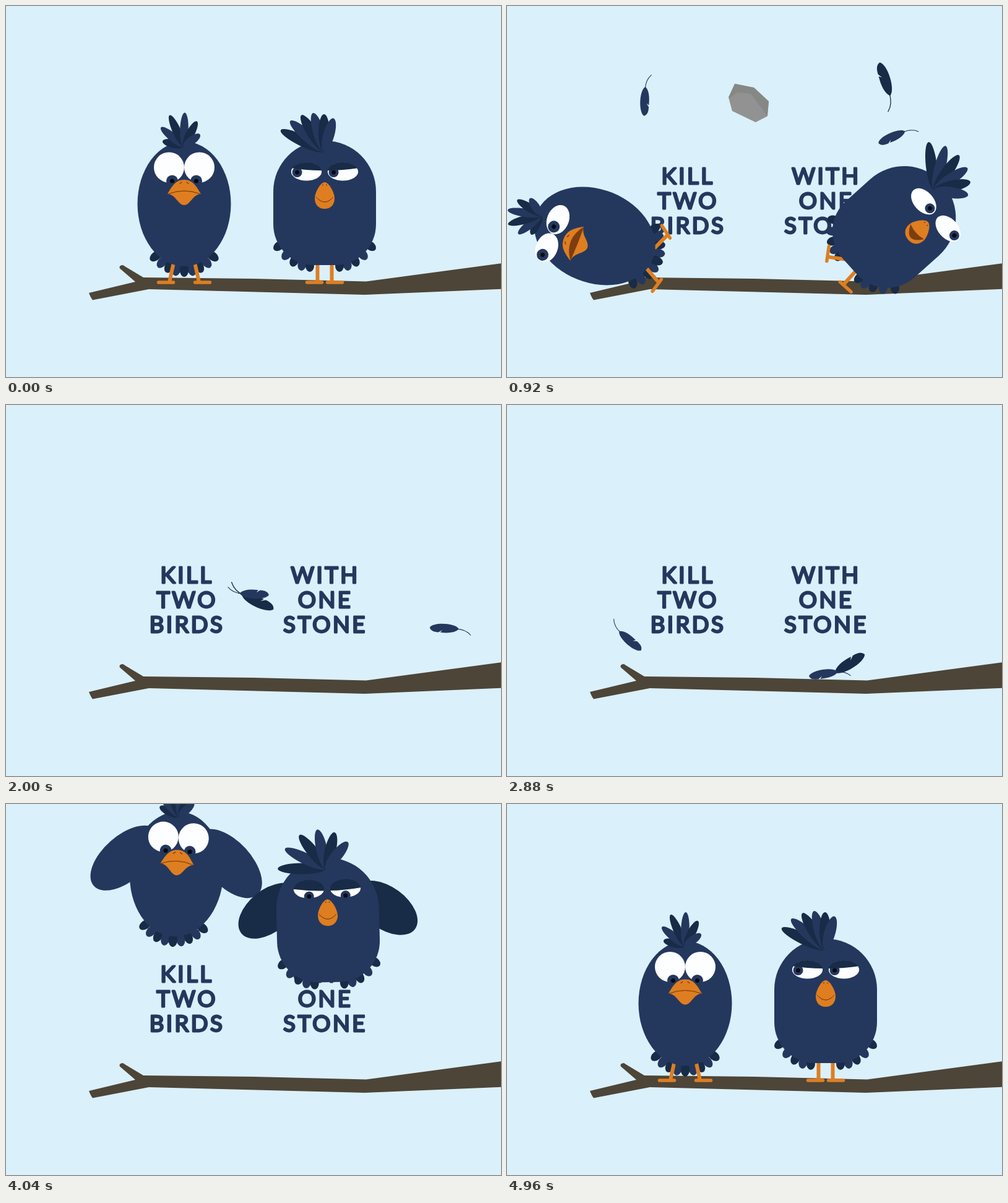
Recreate the animation shown at these times as an HTML page with a canvas. Size 800 by 600 pixels, loop 5 s.

```html
<!DOCTYPE html>
<html lang="en">
<head>
<meta charset="utf-8">
<title>Two birds</title>
<style>
  html, body { margin: 0; width: 100%; height: 100%; overflow: hidden; background: #daf0fb; }
  canvas { display: block; width: 100vw; height: 100vh; }
</style>
</head>
<body>
<canvas id="stage" width="800" height="600"></canvas>
<script>
const ctx = document.getElementById('stage').getContext('2d');
const LOOP = 5000, RETURN = 3380;
const SKY = '#daf0fb', NAVY = '#24385e', DARK = '#182b47', ORANGE = '#de7e21',
      BROWN = '#7d3d10', BARK = '#4d4538', WHITE = '#fdfeff';
const rad = deg => deg * Math.PI / 180;
const lerp = (a, b, k) => a + (b - a) * k;
const part = (t, a, b) => Math.min(1, Math.max(0, (t - a) / (b - a)));
const ramp = (t, a, b) => { const k = part(t, a, b); return k * k * (3 - 2 * k); };
const bump = (t, a, b) => Math.sin(Math.PI * part(t, a, b));

function at(x, y, deg, draw) {
  ctx.save();
  ctx.translate(x, y);
  ctx.rotate(rad(deg));
  draw();
  ctx.restore();
}
function oval(x, y, rx, ry, color, deg = 0) {
  ctx.fillStyle = color;
  ctx.beginPath();
  ctx.ellipse(x, y, rx, ry, rad(deg), 0, 7);
  ctx.fill();
}
function shape(path, color) {
  ctx.fillStyle = color;
  ctx.fill(new Path2D(path));
}
function line(path, color, width, cap = 'round') {
  ctx.strokeStyle = color;
  ctx.lineWidth = width;
  ctx.lineCap = cap;
  ctx.stroke(new Path2D(path));
}

const skinny = {
  x: 288, y: 320, hit: 560, land: 740,
  fling: { x: -405, y: -939, spin: -189 },
  flight: { top: -485, mid: -207, low: -97, drift: .06, tilt: -.015 },
  body: () => oval(0, 0, 75.5, 101, NAVY),
  tail() {
    for (let k = 4; k >= 0; k--)
      for (const side of [-1, 1])
        oval(side * 75 * Math.sin(k * .165), 107 * Math.cos(k * .165), 7, 11, k % 2 ? NAVY : DARK, -side * k * 13);
  },
  crest: { y: -93, lean: -11, spread: 65, windy: -10, jolt: -14,
           size: i => 35 + 21 * Math.sin(i * .65), width: 13.5 },
  leg: { hip: 17.5, lean: 6.5, heel: 0, toe: 24, length: 30, splay: [15, -55] },
  eye: { x: 24.5, y: -59, rx: 24.5, ry: 24.5, iris: 9.5, squint: 5, jolt: -.28 },
  look: { calm: [0, 22], down: [0, 22], dazed: [-13, -2] },
  wing: { x: 40, y: -65, reach: 62, rx: 68, ry: 36, color: NAVY, high: 45, low: 42 },
  beak: 'M-27-16C-20-28-14-39 0-39S20-28 27-16C13-15 10 2 0 2S-13-15-27-16Z',
  nostrils: 'M-7-33l3-2M7-33l-3-2',
  mouth: { half: 26, y: -16, bend: -10 },
  face: { x: -22, y: -6 }
};
const stout = {
  x: 515, y: 318, hit: 660, land: 640,
  fling: { x: 438, y: -646, spin: 184 },
  flight: { top: -465, mid: -131, low: -39, drift: -.04, tilt: .011 },
  body() {
    ctx.fillStyle = NAVY;
    ctx.beginPath();
    ctx.roundRect(-83, -100, 166, 201, [82, 82, 66, 66]);
    ctx.fill();
  },
  tail() {
    for (let k = 4; k >= 0; k--)
      for (const side of [-1, 1])
        oval(side * (24 + 12.5 * k), 102 - 2 * k * k, 7, 10, k % 2 ? NAVY : DARK, -side * k * 13);
  },
  crest: { y: -83, lean: -24, spread: 40, windy: 25, jolt: 22, size: i => 78 - 4.5 * i, width: 18 },
  leg: { hip: 11.5, lean: 0, heel: -7, toe: 17, length: 32, splay: [50, -6] },
  eye: { x: 29.5, y: -50, rx: 24.7, ry: 14.5, iris: 8, squint: 0, jolt: .1 },
  look: { calm: [-15, 1], down: [0, 11.5], dazed: [15, 0] },
  lids: true,
  wing: { x: 54, y: -48, reach: 51, rx: 58, ry: 34, color: DARK, high: 38, low: 63 },
  beak: 'M0-33C7-33 16-16 16-7 16 4 9 10 0 10S-16 4-16-7C-16-16-7-33 0-33Z',
  nostrils: 'M-3-29v1M3-29v1',
  mouth: { half: 14, y: -9, bend: 16 },
  face: { x: 31, y: -8 }
};

function struckPose({ hit, fling, look }, t) {
  const s = Math.max(0, t - hit) / 1000, shock = ramp(t, hit, hit + 120);
  return { x: fling.x * s, y: fling.y * s + 3000 * s * s, turn: fling.spin * s, shock,
    dip: 0, lift: 0, wind: shock * .5, wingAngle: null, lid: lerp(-4, -20, shock),
    look: look.calm.map((v, n) => lerp(v, look.dazed[n], shock)) };
}

function returnPose({ land, flight, look, wing }, t, sag) {
  const touch = 4000 + land;
  const y = t < 4040 ? lerp(flight.top, flight.mid, 1 - (1 - part(t, 3400, 4040)) ** 1.4)
    : t < 4520 ? lerp(flight.mid, flight.low, part(t, 4040, 4520))
    : lerp(flight.low, 0, part(t, 4520, touch));
  const flap = lerp(wing.high, wing.low, ramp(t, 4040, 4520)) - 16 * Math.sin((t - 4040) / 240 * 2 * Math.PI);
  const fold = ramp(t, touch - 120, touch + 20), glance = ramp(t, 4660, 4840);
  return { x: flight.drift * y, y, turn: flight.tilt * y, shock: 0,
    dip: 6 * bump(t, touch - 30, touch + 260),
    lift: 100 * (1 - ramp(t, touch - 280, touch - 70)),
    wind: Math.min(1, .45 - y / 240) * (1 - ramp(t, touch - 40, touch + 220)),
    wingAngle: fold < 1 ? lerp(flap, 100, fold) : null,
    lid: Math.max(lerp(1, -20, ramp(t, 4200, 4440)), lerp(-20, -4, glance)),
    look: look.down.map((v, n) => lerp(v, look.calm[n], glance)) };
}

function drawWings({ wing }, angle) {
  for (const side of [-1, 1])
    oval(side * (wing.x + wing.reach * Math.cos(rad(angle))), wing.y + wing.reach * Math.sin(rad(angle)),
      wing.rx, wing.ry, wing.color, side * angle);
}

function drawLegs({ leg }, pose) {
  [-1, 1].forEach((side, n) => {
    const lift = Math.min(50, pose.lift * (n ? .55 : 1));
    at(side * leg.hip, 97 - lift - pose.dip, leg.splay[n] * pose.shock, () => {
      line(`M0 0L${side * leg.lean} ${leg.length}`, ORANGE, 6, 'butt');
      line(`M${side * leg.heel} ${leg.length}H${side * leg.toe}`, ORANGE, 5.4);
    });
  });
}

function drawCrest({ crest }, { wind, shock }) {
  const spread = crest.spread + crest.windy * wind;
  for (let i = 0; i < 6; i++) {
    const length = crest.size(i);
    at(-1, crest.y, crest.lean + crest.jolt * shock + spread * (i / 2.5 - 1), () =>
      oval(0, -length / 2, crest.width / 2, length / 2, i % 2 ? NAVY : DARK));
  }
}

function drawEye({ eye, lids }, side, { shock, look, lid }) {
  at(side * eye.x, eye.y, 0, () => {
    const height = eye.ry * (1 + eye.jolt * shock), px = look[0] - side * eye.squint * (1 - shock);
    oval(0, 0, eye.rx, height, WHITE);
    oval(px, look[1], eye.iris, eye.iris, NAVY);
    oval(px, look[1], 3.5, 3.5, '#050a14');
    if (!lids) return;
    ctx.beginPath();
    ctx.ellipse(0, 0, eye.rx + .4, height + .6, 0, 0, 7);
    ctx.clip();
    shape(`M-26-20H26V${lid - 2 * side}Q0 ${lid + 2}-26 ${lid + 2 * side}Z`, DARK);
  });
}

function drawBeak({ beak, mouth, nostrils }, shock) {
  ctx.scale(1 + .1 * shock, 1);
  shape(beak, ORANGE);
  const { half, y, bend } = mouth, gape = 11 * shock;
  const lips = `M${-half} ${y}Q0 ${y + bend - gape} ${half} ${y}Q0 ${y + bend + gape} ${-half} ${y}Z`;
  shape(lips, BROWN);
  line(lips, BROWN, .8);
  line(nostrils, BROWN, 1.4);
}

function drawBird(bird, t, sag) {
  const pose = t < RETURN ? struckPose(bird, t) : returnPose(bird, t);
  const ride = (800 - bird.x) * sag;
  at(bird.x + pose.x, bird.y + pose.y + ride, pose.turn, () => {
    if (pose.wingAngle !== null) drawWings(bird, pose.wingAngle);
    ctx.translate(0, pose.dip);
    bird.tail();
    drawLegs(bird, pose);
    bird.body();
    drawCrest(bird, pose);
    ctx.translate(bird.face.x * pose.shock, bird.face.y * pose.shock);
    drawEye(bird, -1, pose);
    drawEye(bird, 1, pose);
    drawBeak(bird, pose.shock);
  });
}

// Each feather swings like a pendulum while its fall slows down.
const feathers = [
  { size: 1.2, color: DARK, mid: 499, sway: 124, lag: .45, top: 118, depth: 480, tilt: 161, turn: -89 },
  { size: 1, color: NAVY, mid: 291, sway: -114, lag: .93, top: 154, depth: 364, tilt: -147, turn: 60 },
  { size: 1, color: NAVY, mid: 615, sway: -104, lag: 1.64, top: 212, depth: 357, tilt: -6, turn: -18 }
];

function drawFeather(t, f) {
  if (t < 620 || t > 3290) return;
  const s = (t - 920) / 1000, rise = Math.min(0, s), drop = Math.max(0, s - 1.96);
  const x = f.mid + f.sway * Math.cos(4 * s - f.lag);
  const y = f.top + f.depth * (1 - Math.exp(-s / 2)) + 2000 * rise * rise + 1900 * drop * drop;
  at(x, y, f.tilt + f.turn * Math.cos(4 * s - .13), () => {
    ctx.scale(f.size, f.size);
    shape('M23.5 0C18-9.5-18-9.5-23.5 0-22 5-17 7-9 7L-3 3-6 7C7 8 19 6 23.5 0Z', f.color);
    line('M20 0Q35 0 43 9', f.color, 1.1);
  });
}

function drawStone(t) {
  if (t < 300 || t > 1700) return;
  const k = part(t, 300, stout.hit), s = Math.max(0, t - stout.hit) / 1000;
  at(lerp(-45, 427, k) - 138 * s, lerp(535, 290, k) - 836 * s + 1250 * s * s, (t - 920) * .36, () => {
    shape('M-23-31L8-25 32-3 30 21 11 31-27 13-33-9Z', '#929292');
    shape('M-23-31L8-25 32-3 30 21 3-15-19-17-31-8-33-9Z', '#868885');
  });
}

function drawBranch(sag) {
  at(800, 437, -sag * 180 / Math.PI, () => {
    ctx.translate(-800, -437);
    shape(`M134 464L209 446 184 424.5Q182 420 188 419 190 419 192 421L222 439
      400 441 582 445.5 820 413.5V457L580 467 231 458 140 475.5Q137 472 134 464Z`, BARK);
  });
}

function drawText() {
  ctx.font = '400 36.5px Lato, sans-serif';
  ctx.letterSpacing = '3.5px';
  ctx.textAlign = 'center';
  ctx.lineJoin = 'round';
  ctx.lineWidth = 2.8;
  ctx.fillStyle = ctx.strokeStyle = NAVY;
  const column = (words, x) => words.split(' ').forEach((word, row) => {
    ctx.fillText(word, x, 287.5 + 40 * row);
    ctx.strokeText(word, x, 287.5 + 40 * row);
  });
  column('KILL TWO BIRDS', 292.5);
  column('WITH ONE STONE', 516);
}

function draw(t) {
  ctx.fillStyle = SKY;
  ctx.fillRect(0, 0, 800, 600);
  const sag = .02 * bump(t, 4610, 4940);
  drawText();
  drawBranch(sag);
  drawBird(skinny, t, sag);
  drawBird(stout, t, sag);
  feathers.forEach(feather => drawFeather(t, feather));
  drawStone(t);
}

const start = performance.now();
function tick() {
  draw((performance.now() - start) % LOOP);
  requestAnimationFrame(tick);
}
tick();
</script>
</body>
</html>
```
